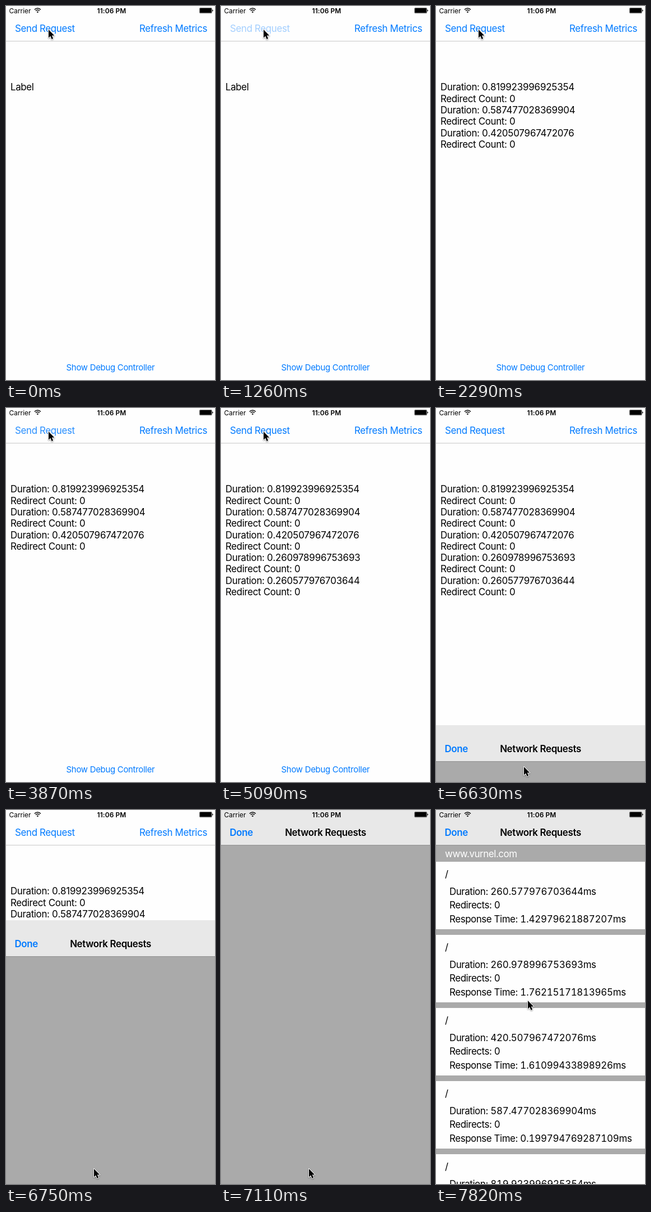
An HTML page for the animation above (8000 ms loop, 373 by 665 pixels).

```html
<!DOCTYPE html>
<html lang="en">
<head>
<meta charset="utf-8">
<title>Network requests</title>
<style>
  html, body { margin: 0; width: 100%; height: 100%; overflow: hidden; }
  body {
    position: relative;
    background: #fefefe;
    color: #000;
    font: 16.9px/20px Inter, "Open Sans", sans-serif;
    letter-spacing: -.34px;
    white-space: nowrap;
  }
  body *  { box-sizing: border-box; }
  .at     { position: absolute; }
  .blue   { color: #007aff; }
  .bold   { font-weight: 600; }
  .middle { left: 0; width: 373px; text-align: center; }
  .loop   { animation: 8s step-end infinite; }

  #rule { left: 0; top: 62px; width: 100%; height: 1px; background: #c9c9c9; }
  #send { animation-name: tap; }
  #show { top: 633px; font-size: 14.92px; letter-spacing: -.27px; animation-name: open; }

  #label { left: 8px; top: 134px; animation-name: label; }
  #log   { left: 8px; top: 134.45px; line-height: 20.28px; animation-name: reveal; }
  #log i { letter-spacing: -.17px; }
  i      { font-style: normal; }

  #sheet {
    left: 0; top: 0; width: 373px; height: 667px;
    background: #aaa;
    animation-name: rise;
  }
  #bar   { left: 0; top: 0; width: 100%; height: 65px; background: #e8e8e8; border-bottom: 1px solid #929292; }
  #table { left: 0; top: 65px; width: 100%; height: 602px; overflow: hidden; letter-spacing: -.42px; animation-name: table; }
  #host  { left: 16px; top: 4.5px; color: #fff; }
  #cells { left: 0; top: 29px; width: 100%; }
  .cell  { position: relative; height: 120px; margin-bottom: 10px; background: #fefefe; }
  .path  { left: 16px; top: 12px; }
  .facts { left: 24px; top: 40.7px; line-height: 24.6px; }
  .facts i { font-variant-numeric: tabular-nums; letter-spacing: -.22px; }

  #status { left: 0; top: 0; width: 373px; height: 16px; font-size: 11.94px; line-height: 17px; letter-spacing: 0; }
  #status svg { left: 0; top: 0; }
  #clock  { left: 2px; letter-spacing: .1px; }
  #cursor { left: 0; top: 0; overflow: visible; filter: drop-shadow(0 1px 1px #0006); animation-name: move; }

  @keyframes tap {
    0%, 11.375%, 18.5%, 26%, 49%, 62.625% { opacity: 1; }
    6.75%, 13.5%, 22.125%, 43.875%, 58.875% { opacity: .2; }
    8.5%, 15.75%, 23.125%, 46.125%, 59.75% { opacity: .2; animation-timing-function: steps(4, jump-both); }
    100% { opacity: 1; }
  }
  @keyframes open {
    0% { opacity: 1; }
    81.375% { opacity: .2; }
    82.125% { opacity: .4; }
    82.875%, 100% { opacity: 1; }
  }
  @keyframes label {
    0% { opacity: 1; }
    18.5%, 100% { opacity: 0; }
  }
  @keyframes reveal {
    0% { clip-path: inset(0 0 100% 0); }
    18.5% { clip-path: inset(0 0 80% 0); }
    23.75% { clip-path: inset(0 0 60% 0); }
    28.625% { clip-path: inset(0 0 40% 0); }
    50.625% { clip-path: inset(0 0 20% 0); }
    63.625%, 100% { clip-path: inset(0 0 0 0); }
  }
  /* Critically damped spring, sampled every 60 ms */
  @keyframes rise {
    0% { transform: translateY(667px); }
    82.875% { transform: translateY(564px); }
    83.625% { transform: translateY(357px); }
    84.375% { transform: translateY(196px); }
    85.125% { transform: translateY(99px); }
    85.875% { transform: translateY(47px); }
    86.625% { transform: translateY(21px); }
    87.375% { transform: translateY(8px); }
    88.875%, 100% { transform: translateY(-2px); }
  }
  @keyframes table {
    0% { opacity: 0; }
    90.375%, 100% { opacity: 1; }
  }
  @keyframes move {
    0% { transform: translate(76px, 42px); }
    71% { transform: translate(76px, 42px); animation-timing-function: steps(2, jump-both); }
    72.5% { transform: translate(112px, 551px); }
    75.5% { transform: translate(112px, 551px); animation-timing-function: steps(5, jump-both); }
    79.125% { transform: translate(157px, 638px); }
    95.625% { transform: translate(157px, 638px); animation-timing-function: steps(3, jump-both); }
    97.75%, 100% { transform: translate(164px, 339px); }
  }
</style>
</head>
<body>
  <div id="rule" class="at"></div>
  <div id="send" class="at blue loop" style="left:16px;top:30px">Send Request</div>
  <div class="at blue" style="left:238px;top:30px">Refresh Metrics</div>
  <div id="label" class="at loop">Label</div>
  <div id="log" class="at loop"></div>
  <div id="show" class="at middle blue loop">Show Debug Controller</div>

  <div id="sheet" class="at loop">
    <div id="bar" class="at">
      <div class="at blue bold" style="left:15.5px;top:32px">Done</div>
      <div class="at middle bold" style="top:32px">Network Requests</div>
    </div>
    <div id="table" class="at loop">
      <div id="host" class="at">www.vurnel.com</div>
      <div id="cells" class="at"></div>
    </div>
  </div>

  <div id="status" class="at">
    <span class="at" style="left:5.5px">Carrier</span>
    <span id="clock" class="at middle bold">11:06 PM</span>
    <svg class="at" width="373" height="16">
      <path d="M50.9 6.4a7.7 7.7 0 0 1 11 0M52.9 8.5a4.9 4.9 0 0 1 7 0" fill="none" stroke="#000" stroke-width="1.5"/>
      <path d="M54.6 10.4a2.5 2.5 0 0 1 3.6 0L56.4 12.3z"/>
      <rect x="345.4" y="3.4" width="22" height="9.4" rx="1.6" fill="none" stroke="#000" stroke-width=".6"/>
      <rect x="346.1" y="4.1" width="20.6" height="8" rx=".9"/>
      <path d="M368.2 6.4q1.5 .4 1.5 1.7t-1.5 1.7z"/>
    </svg>
  </div>

  <svg id="cursor" class="at loop" width="14" height="20">
    <path d="M0 0V14.6L3.3 11.5 5.6 16.9 8.1 15.8 5.8 10.5H10.3z" stroke="#fff" stroke-width="1.8" stroke-linejoin="round" paint-order="stroke"/>
  </svg>

<script>
  // Fraction digits of each duration in seconds, with its response time in ms
  const requests = [
    ["819923996925354", "0.20500183105469"],
    ["587477028369904", "0.199794769287109"],
    ["420507967472076", "1.61099433898926"],
    ["260978996753693", "1.76215171813965"],
    ["260577976703644", "1.42979621887207"],
  ];
  const markDigits = text => text.replace(/\d+/g, "<i>$&</i>");
  const fill = (id, html) => document.getElementById(id).innerHTML = html;

  fill("log", requests.map(([digits]) =>
    markDigits(`Duration: 0.${digits}<br>Redirect Count: 0<br>`)).join(""));

  fill("cells", [...requests].reverse().map(([digits, response]) => {
    const millis = `${digits.slice(0, 3)}.${digits.slice(3)}`;
    const facts = `Duration: ${millis}ms<br>Redirects: 0<br>Response Time: ${response}ms`;
    return `<div class="cell"><div class="at path">/</div><div class="at facts">${markDigits(facts)}</div></div>`;
  }).join(""));
</script>
</body>
</html>
```
